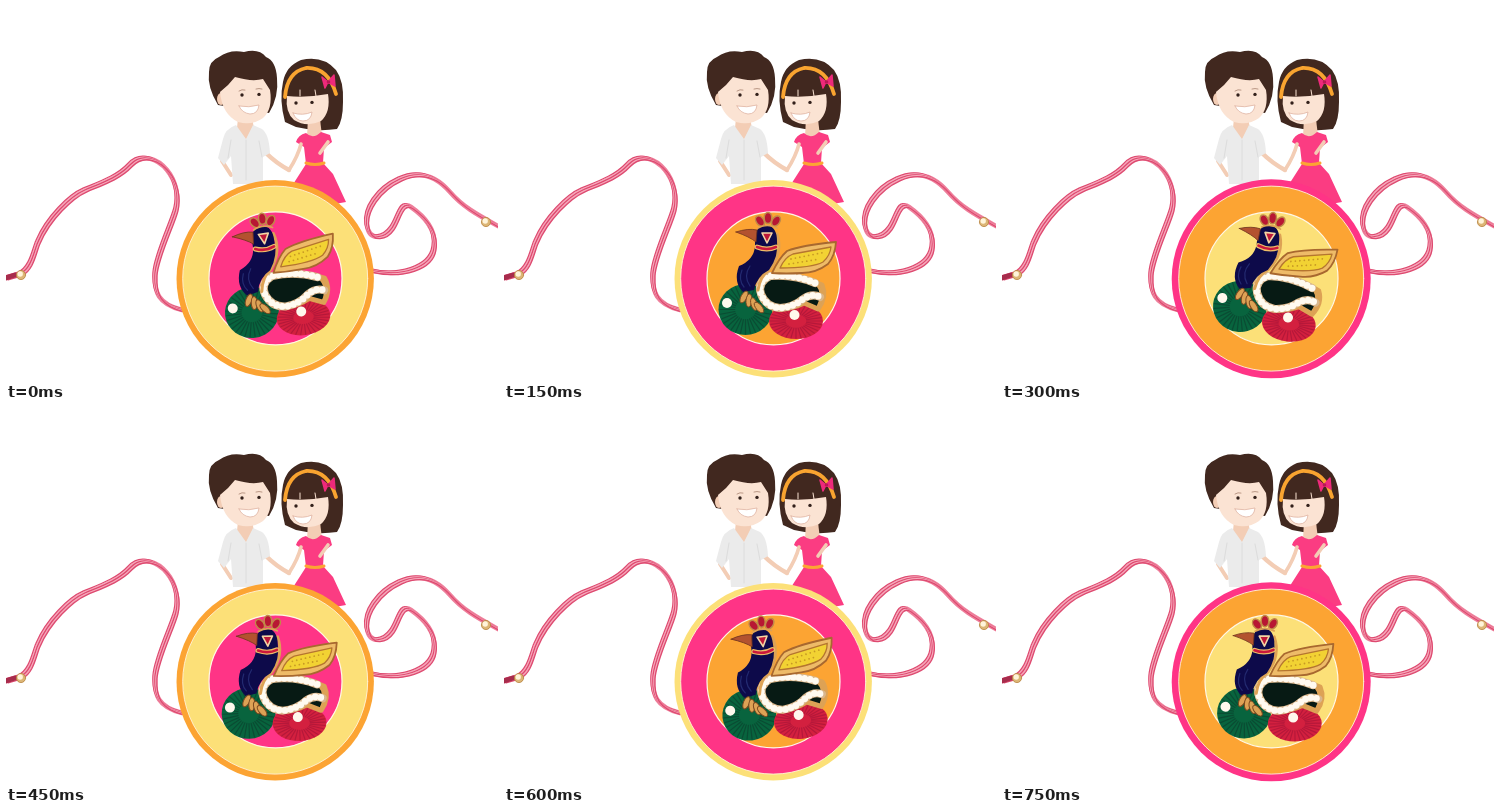
Recreate the animation shown at these times as an HTML page with a canvas. Size 492 by 375 pixels, loop 0.9 s.

```html
<!DOCTYPE html>
<html lang="en">
<head>
<meta charset="utf-8">
<title>Rakhi</title>
<style>
  html, body { margin: 0; width: 100%; height: 100%; overflow: hidden; background: #fff; }
  canvas { display: block; width: 492px; height: 375px; }
</style>
</head>
<body>
<canvas id="stage" width="492" height="375"></canvas>
<script>
const ctx = document.getElementById('stage').getContext('2d');
const ORANGE = '#fca433', YELLOW = '#fce078', PINK = '#ff3486';
const HAIR = '#41281f', SKIN = '#fbe3d3', SHADE = '#f3cdb5';
const GOLD = '#dda255', NAVY = '#0d0a4a';
const STEP = 150;
const TILTS = [-7.5, 0, 6.5, -2, -6.5, -1];
const COLOURS = [ORANGE, YELLOW, PINK];

function paint(path, fill, stroke, width = 1) {
  if (fill) { ctx.fillStyle = fill; ctx.fill(path); }
  if (stroke) { ctx.strokeStyle = stroke; ctx.lineWidth = width; ctx.stroke(path); }
}

function shape(d, fill, stroke, width) {
  paint(new Path2D(d), fill, stroke, width);
}

function line(d, stroke, width) {
  shape(d, null, stroke, width);
}

function oval(x, y, rx, ry, fill, stroke, width, turn = 0) {
  const p = new Path2D();
  p.ellipse(x, y, rx, ry, turn, 0, Math.PI * 2);
  paint(p, fill, stroke, width);
}

function dot(x, y, r, fill, stroke, width) {
  oval(x, y, r, r, fill, stroke, width);
}

// A row of round beads: zero-length dashes with round caps
function beads(d, gap, colour, size) {
  ctx.setLineDash([0, gap]);
  line(d, colour, size);
  ctx.setLineDash([]);
}

// A bundle of parallel strands
function thread(d) {
  line(d, '#ee7f9b', 4.6);
  for (let k = -2; k <= 2; k++) {
    ctx.save();
    ctx.translate(k, k * 0.9);
    line(d, k % 2 ? '#f6a9bb' : '#de4a70', 1.3);
    ctx.restore();
  }
}

function knot(x, y) {
  dot(x, y, 4.6, '#dcb676', '#b98540', 0.8);
  dot(x - 0.8, y - 1, 2.7, '#fff4da');
}

function threads() {
  thread('M0 272 L14 268 C26 262 28 245 32 236 C42 212 65 190 79 184 S112 172 124 159 S152 153 161 164 S173 190 170 203 S150 250 149 268 S152 298 176 304');
  thread('M362 264 C395 272 425 262 428 242 S415 208 405 201 S393 212 386 222 S364 236 361 220 S372 183 394 173 S432 172 444 186 S470 208 492 220');
  line('M0 272 L9 269', '#a72c4c', 5);
  knot(15, 269);
  knot(480, 216);
}

function eyes(x, y, gap) {
  dot(x, y, 1.7, '#33201b');
  dot(x + gap, y - 0.6, 1.7, '#33201b');
}

function boy() {
  line('M216 155 L225 169', SHADE, 4);
  line('M260 147 Q270 157 283 164', SHADE, 4.5);
  shape('M232 112 H246 L248 122 L240 134 L231 122Z', SHADE);
  shape('M230 119 Q219 123 217 133 L212 152 L218 159 L225 150 L227 178 H257 V151 L264 147 Q263 128 256 123 L247 119 L240 133Z', '#ebebeb');
  line('M225 134 L222 152 M253 135 L256 151 M240 134 V174', '#dcdcdc', 1);
  shape('M212 99 Q201 81 203 66 Q203 55 213 51 Q224 43 238 46 Q253 42 260 51 Q270 55 271 72 Q273 91 263 107Z', HAIR);
  oval(215, 93, 4, 6, SHADE);
  shape('M214 86 Q223 79 229 71 Q246 76 257 73 L264 84 Q267 103 257 112 Q246 120 232 116 Q216 108 214 86Z', SKIN);
  eyes(236, 89, 17);
  line('M233 85 Q236 83 239 84 M250 83 Q253 82 256 83', '#a98471', 0.8);
  shape('M233 100 Q243 102 253 99 Q252 108 244 108 Q236 107 233 100Z', '#fff', '#e0b4a2', 0.8);
}

function girl() {
  shape('M279 116 Q273 94 277 76 Q280 60 295 54 Q317 49 330 64 Q338 75 337 96 Q337 115 331 123 Q310 126 290 121 Z', HAIR);
  shape('M302 113 H314 L316 130 Q307 137 301 130Z', SHADE);
  shape('M300 127 Q307 134 315 126 L324 129 L326 136 L318 142 L317 157 L327 168 L340 196 Q313 203 284 183 L300 158 L298 141 L290 136 Q292 129 300 127Z', '#fb3c82');
  line('M295 138 Q292 150 283 164', SHADE, 3.6);
  line('M322 136 L314 147', SHADE, 3.6);
  line('M300 157 Q309 160 318 157', ORANGE, 3);
  shape('M281 90 Q300 92 322 88 Q325 106 315 115 Q301 122 288 114 Q279 106 281 90Z', SKIN);
  line('M294 84 V90 M309 84 L310 90', SKIN, 1);
  line('M279 91 Q281 66 300 62 Q322 61 330 88', '#f9a430', 3.8);
  shape('M322 76 L316 71 L319 82 L322 76 L328 69 L329 80Z', '#ee2a7b', '#ee2a7b', 1.5);
  dot(322.5, 76, 1.8, '#b91955');
  eyes(290, 97, 16);
  shape('M287 107 Q297 110 306 106 Q305 115 297 115 Q290 115 287 107Z', '#fff', '#e0b4a2', 0.8);
}

function disc(step) {
  const [rim, ring, core] = [0, 1, 2].map(i => COLOURS[(step + i) % 3]);
  dot(269.2, 272.8, rim === PINK ? 99.5 : 98.7, rim);
  dot(269.2, 272.6, 92.5, ring, '#fff3d8', 0.9);
  dot(269.5, 272.4, 66.5, core, '#fff8e7', 1.2);
}

function pom(x, y, rx, ry, base, dark) {
  oval(x, y, rx, ry, base);
  for (let a = 0; a < Math.PI * 2; a += Math.PI / 16) {
    const p = new Path2D();
    p.moveTo(x + Math.cos(a) * rx * 0.4, y + Math.sin(a) * ry * 0.4);
    p.lineTo(x + Math.cos(a) * rx * 0.95, y + Math.sin(a) * ry * 0.95);
    paint(p, null, dark, 1.2);
  }
}

function tail() {
  const chain = 'M311 277 Q290 268 266 270 Q253 276 257 288 Q262 301 276 302 Q290 301 299 293 Q308 287 316 291';
  shape('M318 279 Q290 266 264 269 Q251 277 256 289 Q262 303 277 303 Q290 302 300 297 L314 303 Q323 291 318 279Z', '#071a14', GOLD, 5);
  line('M313 278 Q321 288 314 301', GOLD, 3);
  line(chain, '#d9b68c', 8);
  beads(chain, 5.6, '#fffaf0', 6.8);
}

function wing() {
  shape('M268 267 Q275 252 283 245 Q298 239 332 236 Q331 250 324 258 Q312 267 298 267 Q282 268 268 267Z', '#eebb68', '#a8682f', 1.8);
  shape('M276 262 Q281 251 289 248 L327 241 Q326 250 319 256 Q308 262 276 262Z', '#f2d233', '#b5752f', 1.3);
  beads('M287 253 L322 246 M285 258 L316 253', 4.5, '#c89a24', 1.8);
}

function head() {
  line('M273 228 Q279 246 266 263 Q256 270 254 284', GOLD, 3);
  shape('M251 230 Q253 219 263 219 Q273 221 273 235 Q275 250 265 264 Q253 270 250 284 L239 286 Q229 276 235 260 Q250 254 251 240Z', NAVY);
  line('M238 264 Q234 274 240 281 M246 260 Q239 270 246 280', '#232a70', 1.2);
  shape('M232 226 Q244 222 253 224 L252 236 Q246 231 232 226Z', '#b3522f', '#70351f', 0.8);
  line('M253 241 Q263 245 272 241', '#edbd68', 5);
  line('M253 241 Q263 245 272 241', '#ca183c', 2.6);
  shape('M258 227 H268 L263 237Z', '#bd1838', '#f3d6a4', 1.6);
  for (let i = -1; i <= 1; i++)
    oval(264 + i * 8, 212 + Math.abs(i) * 3, 3.8, 5.6, '#b81733', '#c08a48', 1.5, i * 0.6);
  line('M254 222 Q263 217 273 222', GOLD, 1.7);
}

function bird() {
  pom(241.5, 303.5, 27, 25.5, '#08643e', '#0a4c33');
  pom(292, 315, 27, 18, '#d3203f', '#b5183a');
  tail();
  wing();
  head();
  for (let i = 0; i < 4; i++)
    oval(240 + i * 5, 291 + i * 3.5, 3, 6.5, GOLD, '#7b4920', 1, 0.5 - i * 0.4);
  dot(223, 297, 5, '#fff8ed');
  dot(290.5, 309, 5, '#fff8ed');
}

function draw(now) {
  const step = Math.floor(now / STEP) % TILTS.length;
  ctx.fillStyle = '#fff';
  ctx.fillRect(0, 0, 492, 375);
  ctx.lineCap = ctx.lineJoin = 'round';
  threads();
  boy();
  girl();
  disc(step);
  ctx.save();
  ctx.translate(266, 271);
  ctx.rotate(TILTS[step] * Math.PI / 180);
  ctx.translate(-266, -271);
  bird();
  ctx.restore();
}

const start = performance.now();
function tick() {
  draw(performance.now() - start);
  requestAnimationFrame(tick);
}
tick();
</script>
</body>
</html>
```
